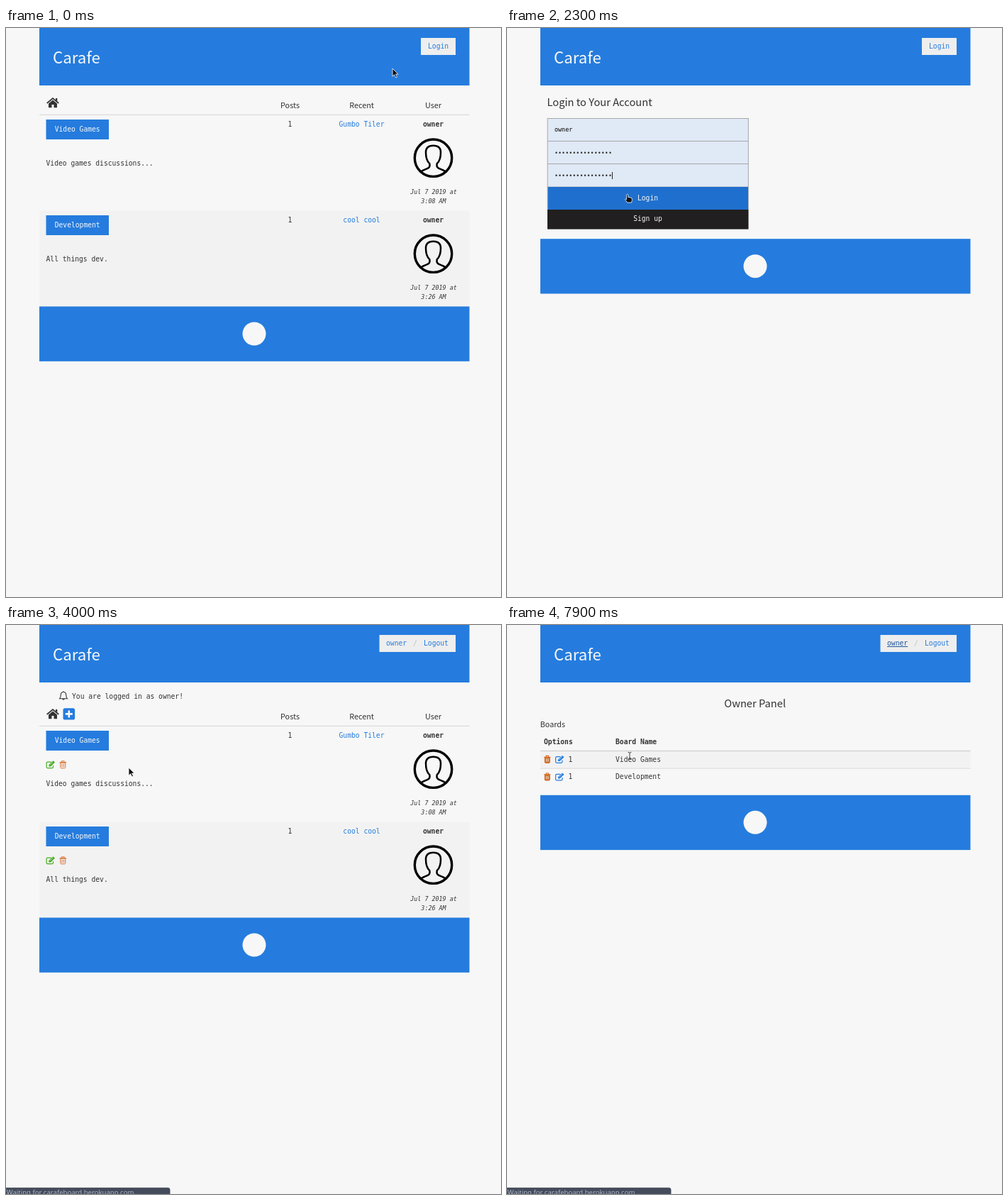
These frames come from a looping animation (698x802 px, 8 s). An HTML page:

```html
<!DOCTYPE html>
<html lang="en">
<head>
<meta charset="utf-8">
<title>Carafe</title>
<style>
  html, body { margin: 0; width: 100%; height: 100%; overflow: hidden; background: #f7f7f7; }
  svg { display: block; }
  text { font: 9.67px "DejaVu Sans Mono", monospace; fill: #333; white-space: pre; }
  .mid { text-anchor: middle; }
  .bold { font-weight: bold; }
  .head { font-family: "Noto Sans CJK JP", "Noto Sans CJK SC", "Noto Sans CJK", sans-serif; font-weight: 300; }
  .h1 { font-size: 22.3px; fill: #f7f7f7; }
  .h2 { font-size: 14.7px; }
  .h3 { font-size: 10.8px; }
  .link { fill: #257cde; }
  .link.hot { fill: #1c549c; text-decoration: underline; }
  .white { fill: #f7f7f7; }
  .field { font-size: 8.42px; }
  .hint { fill: #757575; }
  .date { font-size: 8.4px; font-style: italic; }
  .status { font: 9.54px "Noto Sans", sans-serif; fill: #aab4c6; }
</style>
</head>
<body>
<svg id="stage" width="698" height="802" viewBox="0 0 698 802"></svg>
<script>
const BLUE = '#257cde', PAPER = '#f7f7f7', USER = 'owner', HOST = 'carafeboard.herokuapp.com';
const LOOP = 8000;

const text = (x, y, s, cls = '', extra = '') => `<text x="${x}" y="${y}" class="${cls}" ${extra}>${s}</text>`;
const box = (x, y, w, h, fill, extra = '') => `<rect x="${x}" y="${y}" width="${w}" height="${h}" fill="${fill}" ${extra}/>`;
const put = (x, y, body) => `<g transform="translate(${x} ${y})">${body}</g>`;
const group = (id, body) => `<g id="${id}">${body}</g>`;

const home = y => put(57, y, `
  <path d="M.7 8 9 1.1 17.3 8" fill="none" stroke="#333" stroke-width="1.7"/>
  <path d="M13 1h2.3v4.5L13 3.6ZM3 8.6 9 3.6l6 5V14.2h-4.5V10h-3v4.2H3Z" fill="#333"/>`);

const edit = (x, y, color) => put(x, y, `
  <path d="M10 6.7V9q0 1.5-1.5 1.5H2.1Q.6 10.5.6 9V3.4Q.6 1.9 2.1 1.9h5.3" fill="none" stroke="${color}" stroke-width="1.2"/>
  <path d="M3.9 8.2V5.9L10 .1l2.5 2.3-6.1 5.8Z" fill="${color}"/>
  <path d="M5.2 6.3 9.7 2" stroke="${PAPER}" stroke-width=".6"/>`);

const trash = (x, y, color, solid) => put(x, y, `
  <path d="M0 2.4h9.6M3.1 2.2V.6h3.4v1.6" fill="none" stroke="${color}" stroke-width="1.1"/>
  <path d="M1.3 2.9h7v6.6q0 1.1-1.1 1.1H2.4q-1.1 0-1.1-1.1Z" fill="${solid ? color : 'none'}" stroke="${color}"/>
  <path d="M3.2 4.4v4.6M4.8 4.4v4.6M6.4 4.4v4.6" stroke="${solid ? '#f2f2f2' : color}" stroke-width=".7"/>`);

const avatar = (x, y) => put(x, y, `<g fill="none" stroke="#000">
  <circle r="26.2" stroke-width="3.4"/>
  <path d="M-18.5 20.5C-16 17-11 16.5-7.5 14.5-4.5 12.8-4.8 10-5.2 8-9.5 4-10.5-2-10.5-8
    -10.5-15-6-17.5 0-17.5S10.5-15 10.5-8C10.5-2 9.5 4 5.2 8 4.8 10 4.5 12.8 7.5 14.5 11 16.5 16 17 18.5 20.5" stroke-width="2.5"/></g>`);

const footer = y => box(47, y, 606.5, 77.3, BLUE) + `<circle cx="350" cy="${y + 38.5}" r="16.5" fill="${PAPER}"/>`;

function boardRow(y, name, about, recent, time, tools) {
  return box(56.5, y + 6.5, 88.5, 28, BLUE) +
    text(100.7, y + 23.4, name, 'mid white') +
    text(56.5, y + (tools ? 84.5 : 71), about) +
    text(400.5, y + 16.4, '1', 'mid') +
    text(501.5, y + 16.4, recent, 'mid link') +
    text(602.5, y + 16.4, USER, 'mid bold') +
    avatar(602.5, y + 60.7) +
    text(603, y + 111.4, 'Jul 7 2019 at', 'mid date') +
    text(603, y + 124.9, time, 'mid date') +
    (tools ? edit(56.5, y + 48.7, '#46ab1f') + trash(75.5, y + 48.7, '#d9773c') : '');
}

function boards(y, tools) {
  return home(y - 24.5) +
    [['Posts', 400.5], ['Recent', 501.5], ['User', 602.5]]
      .map(([s, x]) => text(x, y - 9.2, s, 'mid head h3')).join('') +
    box(47, y + 135, 606.5, 135, '#f2f2f2') +
    box(47, y - .7, 606.5, 1, '#d5d5d5') +
    boardRow(y, 'Video Games', 'Video games discussions...', 'Gumbo Tiler', '3:08 AM', tools) +
    boardRow(y + 135, 'Development', 'All things dev.', 'cool cool', '3:26 AM', tools) +
    footer(y + 270);
}

const dots = '•'.repeat(16);
const loginPage = text(56.5, 109.7, 'Login to Your Account', 'head h2') +
  group('autofill', box(57.5, 127.5, 283, 64, '#e0e9f6')) +
  group('filled', box(57.5, 191.5, 283, 32, '#e0e9f6') + text(67, 211, dots, 'field')) +
  group('hint', text(67, 211, 'Confirm Password', 'field hint')) +
  group('caret', box(148, 203, 1, 10, '#222')) +
  '<path d="M57 127.5h283.5M57 159.5h283.5M57 191.5h283.5M57 224h283.5M57.2 127v129M340.3 127v129" stroke="#a6a8ab"/>' +
  text(67, 146.3, USER, 'field', 'id="name"') + text(67, 178.8, dots, 'field') +
  box(57.5, 224, 282.5, 32, BLUE, 'id="submit"') + text(198.5, 243, 'Login', 'mid white') +
  box(57, 256, 283.5, 27.6, '#211f1f') + text(198.5, 272.3, 'Sign up', 'mid white') +
  footer(297.2);

const panelRow = (y, name) => trash(52, y, '#d2691e', true) + edit(68, y, BLUE) +
  text(86.5, y + 8.8, '1') + text(153, y + 8.8, name);

const panelPage = text(349.7, 116, 'Owner Panel', 'mid head h2') + text(46.7, 144, 'Boards', 'head h3') +
  text(52, 167.6, 'Options', 'bold') + text(153, 167.6, 'Board Name', 'bold') +
  box(47, 178, 606.5, 24, '#f2f2f2') + box(47, 176.8, 606.5, 1.3, '#d0d0d0') + box(47, 201.6, 606.5, 1, '#dadada') +
  panelRow(183.8, 'Video Games') + panelRow(208.4, 'Development') + footer(239.8);

const notice = put(81, 100, `
  <path d="M-5.5 3.8C-3.6 2-3.8 0-3.7-2-3.5-4.4-2-5.5 0-5.5S3.5-4.4 3.7-2C3.8 0 3.6 2 5.5 3.8ZM-1.3 4.2q1.3 2 2.6 0M0-5.5v-1.2"
    fill="none" stroke="#333" stroke-width="1.1"/>`) +
  text(93, 104.3, `You are logged in as ${USER}!`) +
  box(80.5, 117.2, 16.6, 16.4, BLUE, 'rx="2.6"') +
  '<path d="M88.8 120.4v10M83.8 125.4h10" stroke="#f7f7f7" stroke-width="2.6"/>';

const statusBar = (id, w, s) => group(id,
  box(-3, 793.4, w + 3, 14, '#444c5c', 'rx="2.5" stroke="#363d4b" stroke-width=".8"') + text(.8, 803.2, s, 'status'));

const cursors = group('arrow',
    '<path d="M0 0V11.2L2.6 8.8 4.7 13 6.5 12.1 4.5 8.1H8Z" fill="#111" stroke="#fff" stroke-width=".8"/>') +
  group('hand',
    '<path d="M-1.4.9Q-.3-.6.8.9V4.4L5 5.2Q6.4 5.6 6.3 7V9.4L5.4 12H-.3L-3.2 8.4Q-3.8 7.1-2.6 6.9L-1.4 7.8Z" fill="#111" stroke="#fff" stroke-width=".8"/>') +
  group('beam',
    '<path d="M-2.4-4.6Q0-4.6 0-3.4 0-4.6 2.4-4.6M0-3.6V4M-2.4 5Q0 5 0 3.8 0 5 2.4 5" fill="none" stroke="#444"/>');

const stage = document.getElementById('stage');
stage.innerHTML = box(0, 0, 698, 802, PAPER) + box(47, 0, 606.5, 81, BLUE) + text(66, 49.6, 'Carafe', 'head h1') +
  group('guest', box(585, 14, 49, 24, '#eee') + text(595, 29, 'Login', 'link', 'id="enter"')) +
  group('member', box(526.5, 14, 107.5, 24, '#eee') + text(536, 29, USER, 'link', 'id="user"') +
    text(574, 29, '/', '', 'style="fill:#c4c4c4"') + text(589, 29, 'Logout', 'link')) +
  group('home', boards(122.5, false)) + group('login', loginPage) +
  group('boards', notice + boards(142.5, true)) + group('panel', panelPage) +
  statusBar('toLogin', 192, `https://${HOST}/login`) +
  statusBar('toPanel', 192, `https://${HOST}/${USER}`) +
  statusBar('waiting', 231, `Waiting for ${HOST}...`) +
  group('cursor', cursors);

// Every table lists [start, value...]; a value holds until the next start.
const pages = [[0, 'home'], [700, 'login'], [4000, 'boards'], [5100, 'panel']];
const statuses = [[0, ''], [300, 'toLogin'], [500, 'waiting'], [700, 'toLogin'], [1200, ''], [3000, 'waiting'],
  [4200, ''], [4800, 'toPanel'], [5400, ''], [7300, 'toPanel'], [7700, 'waiting']];
const hotLinks = [[0, ''], [200, 'enter'], [700, ''], [4800, 'user'], [5100, ''], [7300, 'user']];
const submitFills = [[0, BLUE], [1500, '#2174d4'], [1600, '#1f70ce'], [1900, BLUE], [2300, '#1f70ce'],
  [2900, '#1a62b8'], [3100, '#1f70ce'], [3400, BLUE]];
const moves = [
  [0, 545, 57, 'arrow'], [100, 562, 47, 'arrow'], [200, 589, 34, 'hand'], [300, 600, 28, 'hand'], [400, 600, 27, 'hand'],
  [900, 575, 45, 'arrow'], [1000, 470, 98, 'arrow'], [1100, 325, 165, 'beam'], [1200, 285, 190, 'beam'],
  [1300, 250, 208, 'beam'], [1400, 226, 220, 'beam'], [1500, 210, 231, 'hand'], [1600, 203, 237, 'hand'],
  [1700, 201.5, 238, 'hand'], [1800, 192, 228, 'hand'], [1900, 180, 212, 'beam'], [2000, 174, 208, 'beam'],
  [2200, 171, 214, 'beam'], [2300, 170, 234, 'hand'], [2400, 170, 246, 'hand'], [3200, 170, 241, 'hand'],
  [3400, 171, 218, 'beam'], [3600, 172, 206, 'beam'], [3800, 173, 201, 'beam'], [4000, 173, 201, 'arrow'],
  [4500, 260, 150, 'arrow'], [4600, 440, 72, 'arrow'], [4800, 547, 27, 'hand'], [5400, 500, 46, 'arrow'],
  [5500, 330, 104, 'arrow'], [5700, 120, 178, 'arrow'], [6000, 50, 198, 'arrow'], [6200, 53, 203, 'arrow'],
  [6300, 56, 207, 'arrow'], [6600, 88, 196, 'arrow'], [6700, 190, 152, 'arrow'], [6900, 345, 92, 'arrow'],
  [7100, 480, 48, 'arrow'], [7300, 556, 22, 'hand'], [7500, 551, 27, 'hand'], [7900, 173, 184, 'beam']];

const el = id => document.getElementById(id);
const show = (id, on) => el(id).style.display = on ? '' : 'none';
const only = (ids, id) => ids.forEach(k => show(k, k === id));
const at = (table, t) => table.findLast(row => row[0] <= t).slice(1);

function draw(now) {
  const t = Math.floor((now % LOOP) / 100) * 100;
  const [page] = at(pages, t), [hot] = at(hotLinks, t), [x, y, shape] = at(moves, t);
  const member = t >= 4000, pasted = t >= 2100;
  only(['home', 'login', 'boards', 'panel'], page);
  only(['toLogin', 'toPanel', 'waiting'], at(statuses, t)[0]);
  only(['arrow', 'hand', 'beam'], shape);
  show('guest', !member);
  show('member', member);
  for (const id of ['enter', 'user']) el(id).classList.toggle('hot', id === hot);
  el('autofill').style.opacity = Math.min(1, Math.max(0, (t - 780) / 220));
  el('name').style.fill = t < 900 ? '#333' : '#000';
  show('filled', pasted);
  show('hint', !pasted);
  show('caret', t >= 2000 && t < 3100);
  el('caret').setAttribute('transform', `translate(${pasted ? 0 : -81} 0)`);
  el('submit').setAttribute('fill', at(submitFills, t)[0]);
  el('cursor').setAttribute('transform', `translate(${x} ${y})`);
}

let start;
function tick(now) {
  start ??= now;
  draw(now - start);
  requestAnimationFrame(tick);
}
draw(0);
requestAnimationFrame(tick);
</script>
</body>
</html>
```
